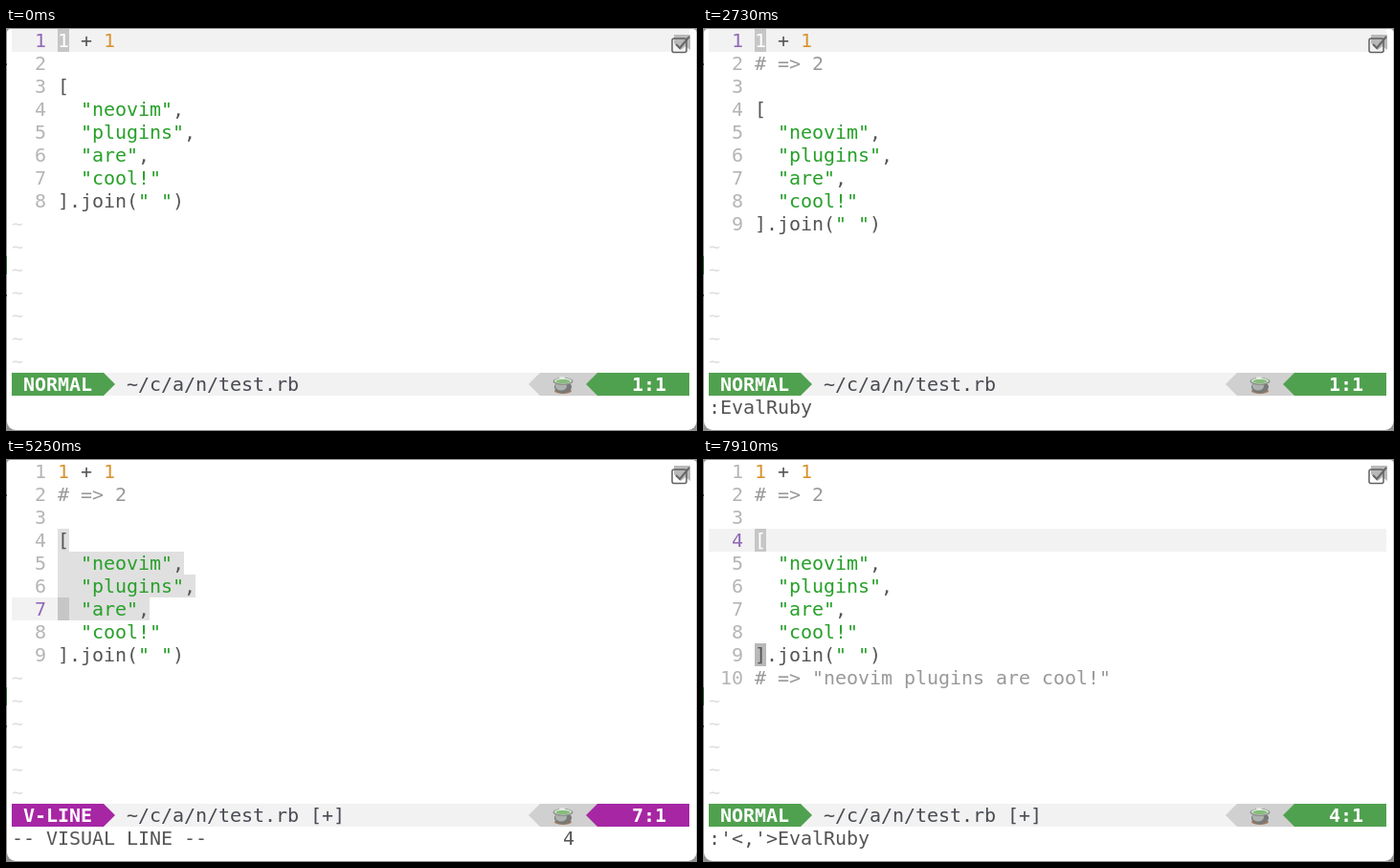
Write an HTML page with a canvas that moves like this. It is 722 px wide and 422 px high and loops after 8 s.

```html
<!DOCTYPE html>
<html lang="en">
<head>
<meta charset="utf-8">
<title>Ruby evaluation in an editor</title>
<style>
html, body { margin: 0; width: 100%; height: 100%; overflow: hidden; background: #fff; }
canvas { display: block; width: 722px; height: 422px; }
</style>
</head>
<body>
<canvas id="stage" width="722" height="422"></canvas>
<script>
const ctx = document.getElementById('stage').getContext('2d');
const LOOP = 8000, CELL = 12, ROW = 24, LEFT = 6, TOP = 1, CODE = 54, RIGHT = 714;
const STATUS = TOP + 15 * ROW, CMD = STATUS + ROW;
const FONT = '20px "DejaVu Sans Mono", monospace';
const C = {
  ink: '#555555', string: '#28a02a', number: '#d9922e', comment: '#999999',
  gutter: '#b5b5b5', current: '#9168b6', tilde: '#dedede', line: '#f2f2f2',
  select: '#e0e0e0', cursor: '#c6c6c6', match: '#b9b9b9', section: '#d0d0d0'
};
const MODES = { NORMAL: '#50a14f', COMMAND: '#c18401', 'V-LINE': '#a626a4' };
const SOURCE = ['1 + 1', '', '[', '  "neovim",', '  "plugins",', '  "are",', '  "cool!"', '].join(" ")'];
const WORD = 'EvalRuby';

const rowY = n => TOP + (n - 1) * ROW;
const count = (t, start, step, max) => t < start ? 0 : Math.min(max, 1 + Math.floor((t - start) / step));

function box(x, y, w, h, color) {
  ctx.fillStyle = color;
  ctx.fillRect(x, y, w, h);
}

function text(str, x, y, color, bold) {
  ctx.font = (bold ? 'bold ' : '') + FONT;
  ctx.fillStyle = color;
  ctx.fillText(str, x, y + 19);
}

function poly(color, ...pts) {
  ctx.fillStyle = color;
  ctx.beginPath();
  for (let i = 0; i < pts.length; i += 2) ctx.lineTo(pts[i], pts[i + 1]);
  ctx.fill();
}

function stroke(color, width, ...pts) {
  ctx.strokeStyle = color;
  ctx.lineWidth = width;
  ctx.beginPath();
  for (let i = 0; i < pts.length; i += 2) ctx.lineTo(pts[i], pts[i + 1]);
  ctx.stroke();
}

function ellipse(x, y, rx, ry, color) {
  ctx.fillStyle = color;
  ctx.beginPath();
  ctx.ellipse(x, y, rx, ry, 0, 0, 7);
  ctx.fill();
}

// Editor state as a function of time
function stateAt(t) {
  const s = { lines: SOURCE.slice(), row: 1, pos: 1, mode: 'NORMAL', cmd: '', plus: t >= 2800, anchor: 0 };
  if (t >= 2730) s.lines.splice(1, 0, '# => 2');
  if (t < 560) return s;
  if (t < 2730) {
    s.mode = 'COMMAND';
    s.cmd = ':' + WORD.slice(0, t < 1050 ? 0 : 1 + count(t, 1330, 140, 7));
  } else if (t < 4830) {
    s.row = s.pos = 1 + count(t, 4200, 140, 3);
    s.cmd = ':' + WORD;
  } else if (t < 5810) {
    s.mode = 'V-LINE';
    s.anchor = 4;
    s.row = s.pos = 4 + count(t, 4970, 140, 5);
    s.cmd = '-- VISUAL LINE --';
  } else if (t < 7490) {
    s.mode = 'COMMAND';
    s.anchor = 4;
    s.row = 9;
    s.pos = 4;
    s.cmd = ":'<,'>" + WORD.slice(0, count(t, 5950, 90, 8));
  } else {
    s.row = s.pos = 4;
    s.cmd = ":'<,'>" + WORD;
    s.lines.push('# => "neovim plugins are cool!"');
  }
  return s;
}

function codeLine(line, y) {
  if (line[0] === '#') return text(line, CODE, y, C.comment);
  for (const m of line.matchAll(/"[^"]*"|\d+|[^"\d\s]+/g)) {
    const color = m[0][0] === '"' ? C.string : /\d/.test(m[0]) ? C.number : C.ink;
    text(m[0], CODE + m.index * CELL, y, color);
  }
}

function buffer(s) {
  const typing = s.mode === 'COMMAND';
  box(LEFT, rowY(s.row), (s.anchor ? CODE : RIGHT) - LEFT, ROW, C.line);
  s.lines.forEach((line, i) => {
    const n = i + 1, y = rowY(n), here = n === s.row;
    if (s.anchor && n >= s.anchor && n <= s.row) box(CODE, y, line.length * CELL, ROW, C.select);
    const paired = line[0] === ']' && (s.row === 4 || here) && s.lines.length > 8;
    if (paired) box(CODE, y, CELL, ROW, C.match);
    text(String(n), 42 - String(n).length * CELL, y, here ? C.current : C.gutter);
    codeLine(line, y);
    if (here && !typing) {
      box(CODE, y, CELL, ROW, C.cursor);
      text(line[0] || '', CODE, y, '#fff');
    }
  });
  for (let n = s.lines.length + 1; n <= 15; n++) text('~', LEFT, rowY(n), C.tilde);
}

function pot() {
  ellipse(582, 380, 9, 3, '#a7785b');
  ellipse(582, 376, 9, 6.5, '#777a78');
  ellipse(580, 375, 6, 4.5, '#aeb2af');
  ellipse(582, 370, 10.5, 4, '#8b918c');
  ellipse(582, 369.5, 9, 3, '#dfe8dc');
  ellipse(582, 370, 7.5, 2.2, '#86bd7c');
  ellipse(581, 366.5, 3, 1.5, '#e4ece2');
}

function statusBar(s) {
  const color = MODES[s.mode], y = STATUS, mid = y + 12, low = y + ROW;
  const end = LEFT + (s.mode.length + 2) * CELL;
  box(LEFT, y, RIGHT - LEFT, ROW, C.line);
  poly(color, LEFT, y, end, y, end + 12, mid, end, low, LEFT, low);
  text(s.mode, 18, y, '#fff', true);
  text('~/c/a/n/test.rb' + (s.plus ? ' [+]' : ''), end + 24, y, '#494b53');
  poly(C.section, 546, mid, 558, y, 618, y, 618, low, 558, low);
  poly(color, 606, mid, 618, y, RIGHT, y, RIGHT, low, 618, low);
  text(s.pos + ':1', 654, y, '#fff', true);
  pot();
}

function commandLine(s) {
  text(s.cmd, LEFT, CMD, C.ink);
  if (s.mode === 'V-LINE') text(String(s.row - s.anchor + 1), 582, CMD, C.ink);
  if (s.mode === 'COMMAND') {
    const x = LEFT + s.cmd.length * CELL;
    box(x, CMD, CELL, ROW, '#b4b4b4');
    box(x + 1, CMD + 1, CELL - 2, ROW - 2, '#cccccc');
  }
}

function cornerIcon() {
  poly('#b9b9b9', 698, 7, 715, 7, 715, 23, 710, 19, 705, 23, 698, 16);
  ctx.strokeStyle = '#606060';
  ctx.lineWidth = 1.5;
  ctx.beginPath();
  ctx.roundRect(696, 11, 15, 14.5, 2);
  ctx.stroke();
  stroke('#666666', 2, 700, 17, 704, 21, 714, 9);
}

function windowFrame() {
  box(0, 0, 722, 422, '#929292');
  ctx.fillStyle = '#fff';
  ctx.beginPath();
  ctx.roundRect(1, 1, 720.5, 420, [4, 4, 9, 9]);
  ctx.fill();
  box(0, 239, 1, 19, '#2c6b35');
  box(0, 37, 1, 2, '#444');
  box(0, 279, 1, 2, '#444');
}

function draw(now) {
  const s = stateAt(now % LOOP);
  windowFrame();
  buffer(s);
  statusBar(s);
  commandLine(s);
  cornerIcon();
}

ctx.letterSpacing = '-0.04px';
const began = performance.now();
function tick() {
  draw(performance.now() - began);
  requestAnimationFrame(tick);
}
tick();
</script>
</body>
</html>
```
